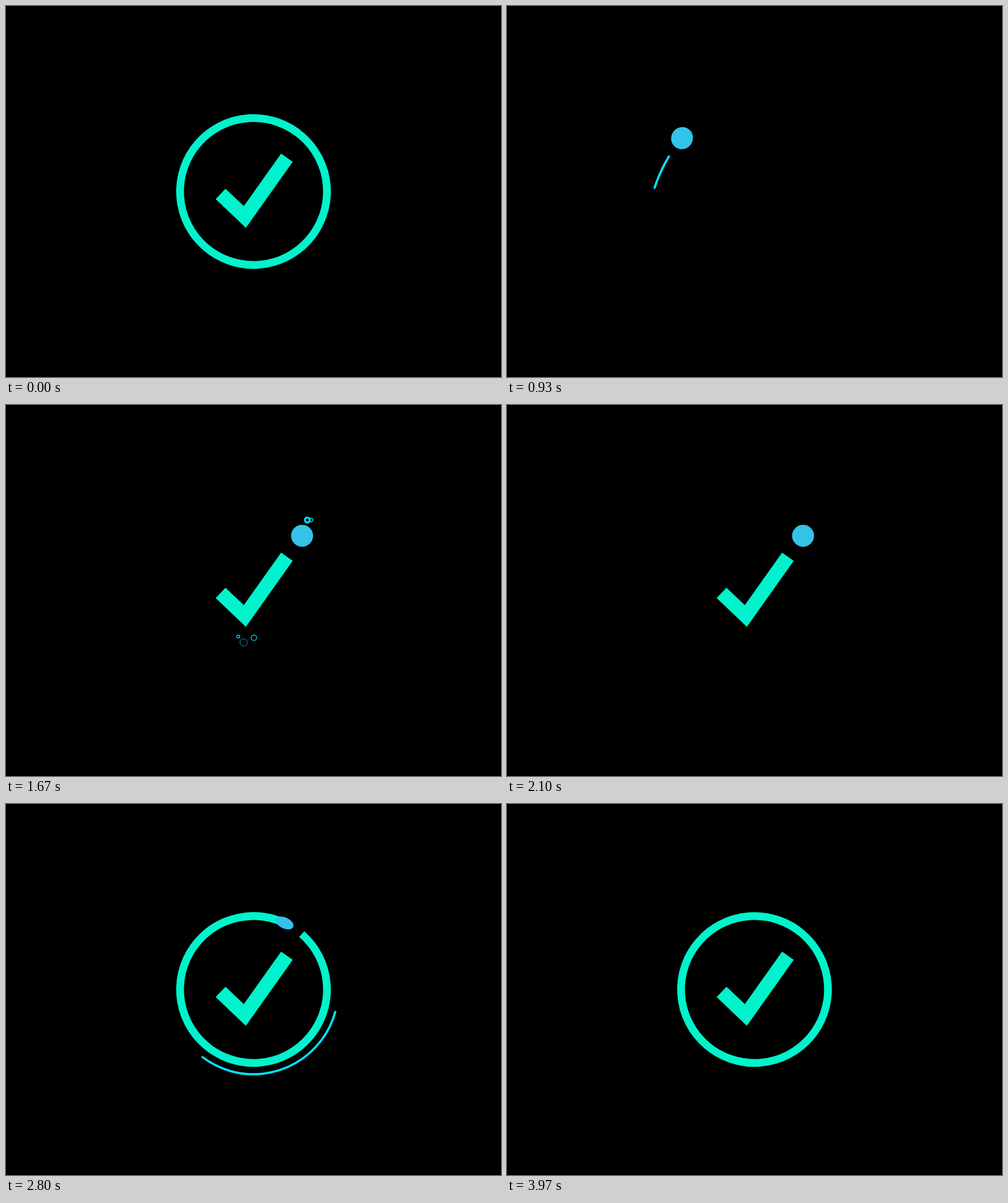
An HTML page with a canvas for the animation above (4010 ms loop, 800 by 600 pixels).

```html
<!DOCTYPE html>
<html lang="en">
<head>
<meta charset="utf-8">
<title>Check mark</title>
<style>
  html, body { margin: 0; width: 100%; height: 100%; overflow: hidden; background: #000; }
  canvas { display: block; }
</style>
</head>
<body>
<canvas id="stage" width="800" height="600"></canvas>
<script type="module">
const ctx = document.getElementById('stage').getContext('2d');
const LOOP = 4010, GREEN = '#00f3cc', BLUE = '#33c3e8', CYAN = '#00e5ff';
const TAU = Math.PI * 2, RING_START = -49 * Math.PI / 180;
const RING_BEGIN = 2119, RING_END = 2997;

const checkStart = [346.8, 303.9], checkCorner = [386, 341.2], checkEnd = [454, 245.4];
const hang = [283, 213.5], perch = [478.5, 211.5];
const FALL_BEGIN = 1000, HIT = 1330, RISE_END = 1660;

const progress = (t, from, to) => Math.min(1, Math.max(0, (t - from) / (to - from)));
const inOut = u => u < .5 ? 4 * u ** 3 : 1 - 4 * (1 - u) ** 3;
const out = u => 1 - (1 - u) ** 3;
const mix = (a, b, u) => [a[0] + (b[0] - a[0]) * u, a[1] + (b[1] - a[1]) * u];
const quad = (a, b, c, u) => mix(mix(a, b, u), mix(b, c, u), u);
const dist = (a, b) => Math.hypot(b[0] - a[0], b[1] - a[1]);

// origin, travel, radius, line width, birth, life
const bubbles = [
  [387, 358, -12, 17, 2.5, 4, 1340, 480],
  [387, 358, -3, 26, 6, 4, 1340, 400],
  [387, 358, 14, 19, 4.5, 4, 1340, 480],
  [481, 198, 10.5, -21, 7, 4, 1560, 450],
  [481, 198, 21, -21, 5, 1.5, 1560, 450],
  [486, 204, 24, -8, 7, 4, 3280, 500],
  [486, 204, 11, 3, 3, 3, 3280, 420],
  [486, 204, 14, -18, 4.5, 4, 3280, 450]
];

// Share of the fall spent in the air before the check begins
const AIR = .67;
const fall = t => progress(t, FALL_BEGIN, HIT) ** 2;
const climb = t => out(progress(t, HIT, RISE_END));
const ringTurn = t => TAU * inOut(progress(t, RING_BEGIN, RING_END));

function ballAt(t) {
  if (t < FALL_BEGIN)
    return quad([255, 445], [245, 270], hang, inOut(progress(t, 560, 960)));
  if (t < HIT) {
    const u = fall(t);
    return u < AIR
      ? quad(hang, [311, 270], checkStart, u / AIR)
      : mix(checkStart, checkCorner, (u - AIR) / (1 - AIR));
  }
  if (t < RING_BEGIN) return mix(checkCorner, perch, climb(t));
  const a = RING_START + ringTurn(t);
  return [400 + 118.75 * Math.cos(a), 300 + 118.75 * Math.sin(a)];
}

function stroke(color, width, cap = 'butt') {
  ctx.strokeStyle = color;
  ctx.lineWidth = width;
  ctx.lineCap = cap;
  ctx.stroke();
}

function arc(radius, from, to, color, width, cap) {
  ctx.beginPath();
  ctx.arc(400, 300, radius, RING_START + from, RING_START + to);
  stroke(color, width, cap);
}

function drawCheck(t) {
  const leg1 = progress(fall(t), AIR, 1);
  const leg2 = Math.min(1, climb(t) * dist(checkCorner, perch) / dist(checkCorner, checkEnd));
  if (!leg1) return;
  ctx.beginPath();
  ctx.moveTo(...checkStart);
  ctx.lineTo(...mix(checkStart, checkCorner, leg1));
  if (leg2) ctx.lineTo(...mix(checkCorner, checkEnd, leg2));
  stroke(GREEN, 23);
}

function drawRing(t) {
  const turn = ringTurn(t);
  if (turn) arc(118.75, 0, turn, GREEN, 12.5);
}

function drawTrails(t) {
  const head = progress(t, 660, 965), tail = progress(t, 660, 1009) ** 2;
  if (head > tail) {
    ctx.beginPath();
    for (let i = 0; i <= 20; i++)
      ctx.lineTo(...quad([228, 420], [215, 305], [274, 225], tail + (head - tail) * i / 20));
    stroke(CYAN, 3.6, 'round');
  }
  const age = Math.max(0, t - 2186);
  const lead = Math.min(360, .181 * age + .000171 * age * age) / 360;
  const follow = Math.min(1, age / 1092) ** 3;
  if (lead > follow) arc(137, follow * TAU, lead * TAU, CYAN, 3.6, 'round');
}

function drawBall(t) {
  const size = 17.8 * out(progress(t, 500, 620)) * (1 - progress(t, 2700, RING_END));
  if (size <= 0) return;
  const [x, y] = ballAt(t), [px, py] = ballAt(t - 4);
  const stretch = 1 + Math.min(.5, Math.hypot(x - px, y - py) / 4 * .6);
  ctx.beginPath();
  ctx.ellipse(x, y, size * stretch, size / stretch, Math.atan2(y - py, x - px), 0, TAU);
  ctx.fillStyle = BLUE;
  ctx.fill();
}

function drawBubbles(t) {
  for (const [x, y, dx, dy, radius, width, birth, life] of bubbles) {
    const u = progress(t, birth, birth + life), e = out(u);
    if (u <= 0 || u >= 1) continue;
    ctx.beginPath();
    ctx.arc(x + dx * e, y + dy * e, radius * e, 0, TAU);
    stroke(CYAN, width * (1 - u));
  }
}

function draw(t) {
  ctx.fillStyle = '#000';
  ctx.fillRect(0, 0, 800, 600);
  if (t < 30) t = LOOP;
  if (t < 500) return;
  drawCheck(t);
  drawRing(t);
  drawTrails(t);
  drawBubbles(t);
  drawBall(t);
}

const start = performance.now();
function tick() {
  draw((performance.now() - start) % LOOP);
  requestAnimationFrame(tick);
}
tick();
</script>
</body>
</html>
```
